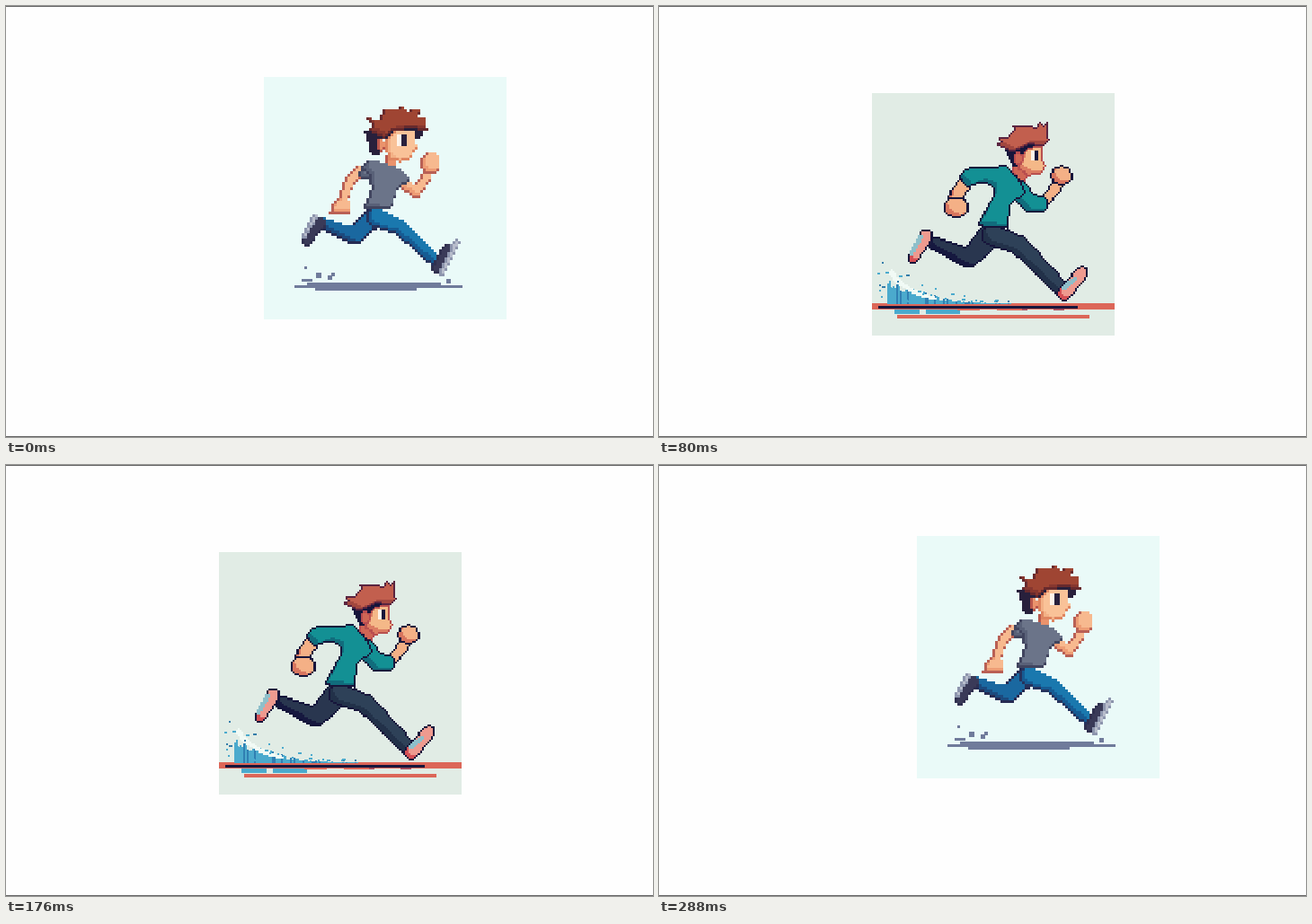
Recreate the animation shown at these times as an HTML page with a canvas. Size 720 by 480 pixels, loop 0.32 s.

```html
<!DOCTYPE html>
<html>
<head>
<meta charset="utf-8">
<style>
  html, body { margin: 0; width: 100%; height: 100%; overflow: hidden; background: #fefefe; }
  canvas { display: block; }
</style>
</head>
<body>
<canvas id="stage" width="720" height="480"></canvas>
<script>
const stage = document.getElementById("stage").getContext("2d");
const parse = text => text.split(" ").map(pair => pair.split(",").map(Number));

// Shapes are tests: (x, y) => is the point inside?
const blob = (cx, cy, rx, ry) => (x, y) => Math.hypot((x - cx) / rx, (y - cy) / ry) < 1;

function poly(text) {
  const points = parse(text);
  return (x, y) => points.reduce((inside, [ax, ay], i) => {
    const [bx, by] = points[(i + 1) % points.length];
    const crosses = ay > y !== by > y && x < ax + (y - ay) / (by - ay) * (bx - ax);
    return crosses ? !inside : inside;
  }, false);
}

// A line through joints whose width goes from "start" to "end".
function limb(text, start, end = start) {
  const joints = parse(text), last = joints.length - 1;
  return (x, y) => joints.slice(1).some(([bx, by], i) => {
    const [ax, ay] = joints[i], dx = bx - ax, dy = by - ay;
    const along = ((x - ax) * dx + (y - ay) * dy) / (dx * dx + dy * dy);
    const t = Math.min(1, Math.max(0, along));
    const width = start + (end - start) * (i + t) / last;
    return Math.hypot(x - ax - t * dx, y - ay - t * dy) < width / 2;
  });
}

function seeded(seed) {
  return () => (seed = seed * 16807 % 2147483647) / 2147483647;
}

function makeScene(left, top, cells, background, edges) {
  const canvas = document.createElement("canvas");
  canvas.width = 720;
  canvas.height = 480;
  const g = canvas.getContext("2d");
  const cell = 270 / cells;

  function rect(color, x, y, w, h) {
    g.fillStyle = color;
    g.fillRect(x, y, w, h);
  }

  // Colours are [edge, base, light]; light falls from the upper right.
  function shade(inside, [edge, base = edge, light = base]) {
    const isEdge = (x, y) => edges.some(([dx, dy]) => !inside(x + dx * cell, y + dy * cell));
    for (let row = 0; row < cells; row++) {
      for (let col = 0; col < cells; col++) {
        const x = left + (col + 0.5) * cell, y = top + (row + 0.5) * cell;
        if (!inside(x, y)) continue;
        const color = isEdge(x, y) ? edge : inside(x - 5, y + 5) ? light : base;
        const x0 = Math.round(x - cell / 2), y0 = Math.round(y - cell / 2);
        rect(color, x0, y0, Math.round(x + cell / 2) - x0, Math.round(y + cell / 2) - y0);
      }
    }
  }

  rect("#fefefe", 0, 0, 720, 480);
  rect("#666", 0, 0, 720, 1);
  rect("#666", 0, 479, 720, 1);
  rect(background, left, top, 270, 270);
  return { canvas, rect, shade };
}

function drawRunner({ shade, rect }, pose, colors) {
  shade(pose.backLeg, colors.backLeg);
  shade(pose.frontLeg, colors.frontLeg);
  for (const shoe of pose.shoes) shade(shoe, colors.shoe);
  for (const sole of pose.soles) shade(sole, colors.sole);
  shade(pose.backArm, colors.skin);
  shade(pose.backHand, colors.skin);
  shade(pose.frontArm, colors.skin);
  shade(pose.fist, colors.skin);
  shade(pose.neck, colors.shadowSkin);
  shade(pose.sleeve, colors.shirt);
  shade(pose.torso, colors.shirt);
  shade(pose.nape, colors.nape);
  shade(pose.face, colors.face);
  shade(pose.ear, colors.shadowSkin);
  const [x, y, white, pupil, height] = pose.eye;
  rect("#fff4ea", x, y, white, height);
  rect(colors.nape[0], x + white, y, pupil, height);
  shade(pose.hair, colors.hair);
}

function grayRunner() {
  const scene = makeScene(287, 79, 90, "#eafaf8", [[-1, 0], [0, 1]]);
  const { rect } = scene, slate = "#707b9b";
  rect(slate, 335, 308, 149, 6);
  rect(slate, 321, 311, 187, 3);
  rect(slate, 344, 314, 113, 3);
  rect(slate, 329, 304, 12, 3);
  for (const [x, y, size] of [[332, 290, 3], [345, 297, 6], [358, 300, 5], [362, 297, 4], [490, 304, 5]])
    rect(slate, x, y, size, size);

  drawRunner(scene, {
    backLeg: limb("408,236 387,257 354,243", 24, 14),
    frontLeg: limb("411,236 437,246 457,264 480,286", 21, 13),
    shoes: [limb("348,242 335,262", 15, 11), limb("481,291 491,271", 14, 12)],
    soles: [limb("344,234 332,255", 6), limb("484,299 501,264", 6, 8)],
    backArm: limb("393,185 381,198 373,220", 14, 11),
    backHand: poly("365,217 382,217 383,231 360,231"),
    frontArm: limb("442,198 456,208 468,190", 12),
    fist: blob(472, 175, 11.5, 12),
    neck: limb("429,168 429,176", 12),
    sleeve: limb("404,181 401,186", 16),
    torso: poly("395,178 402,172 420,174 435,180 448,189 448,196 436,204 428,227 397,226 406,205 405,191"),
    nape: poly("399,139 430,136 464,136 462,149 454,149 444,142 428,149 418,149 415,165 406,165"),
    face: poly("421,151 434,138 455,140 457,160 449,170 440,174 425,172"),
    ear: blob(417, 155, 5, 7),
    eye: [435, 143, 5, 6, 13],
    hair: poly("400,124 414,127 422,114 434,115 440,110 446,117 463,114 458,122 467,126 469,138 448,137 430,139 422,148 403,139 407,132")
  }, {
    backLeg: ["#262b53", "#1c4a7e", "#1a68a0"],
    frontLeg: ["#26345e", "#165b93", "#1a78ae"],
    shoe: ["#30304f", "#3a3a58"],
    sole: ["#8d95ad", "#b8bdcc"],
    skin: ["#b96055", "#ee9d75", "#f7b98f"],
    face: ["#df8560", "#f3b186", "#f9c298"],
    shadowSkin: ["#b9574c", "#ea936c"],
    shirt: ["#41455f", "#596178", "#6b7489"],
    nape: ["#28203c"],
    hair: ["#672a2d", "#87372f", "#9f4533"]
  });
  return scene.canvas;
}

function tealRunner() {
  const paper = "#e1ece5", ink = "#17153b", red = "#dc6658", blue = "#4baacd";
  const scene = makeScene(237, 97, 128, paper, [[-1, 0], [0, 1], [1, 0], [0, -1]]);
  const { rect, shade } = scene, random = seeded(17);

  // track and its broken reflection
  rect(red, 237, 331, 270, 7);
  rect(red, 265, 344, 214, 4);
  rect(ink, 244, 334, 222, 3);
  for (let i = 0; i < 24; i++) {
    const wet = i < 12, x = (wet ? 262 : 330) + random() * (wet ? 68 : 120);
    rect(wet ? blue : random() < 0.5 ? "#a34a5a" : red, Math.round(x), wet ? 338 : 337, 12, wet ? 5 : 2);
  }

  // splash: a plume that falls away to the right, with loose drops
  for (let x = 254; x < 398; x += 2) {
    const height = 34 * Math.exp(-Math.abs(x - 263) / 34) * (0.5 + random() / 2);
    rect(random() < 0.2 ? "#307fb2" : blue, x, Math.round(332 - height), 2, Math.round(height));
  }
  shade(limb("259,297 267,308 285,319 307,326", 6, 4), ["#f1faf5"]);
  for (let i = 0; i < 36; i++) {
    const reach = random() ** 2;
    const x = 242 + reach * 150, y = 328 - random() * 52 * (1 - reach) ** 2;
    rect(i % 4 ? blue : "#357da9", Math.round(x), Math.round(y), random() < 0.3 ? 4 : 2, 2);
  }

  drawRunner(scene, {
    backLeg: limb("370,254 345,281 308,265", 28, 16),
    frontLeg: limb("371,255 400,266 421,287 445,312", 24, 18),
    shoes: [limb("297,257 283,280", 17, 13), limb("451,320 471,297", 17, 15)],
    soles: [limb("291,257 281,276", 5), limb("450,315 462,304", 5)],
    backArm: limb("341,196 331,211 330,222", 16, 18),
    backHand: blob(331, 224, 14, 12),
    frontArm: limb("430,217 444,199", 13),
    fist: blob(448, 189, 12.5, 11),
    neck: limb("399,181 403,190", 13),
    sleeve: limb("398,203 414,220 424,220", 22, 20),
    torso: poly("333,190 345,179 386,178 399,189 408,208 392,221 388,248 354,245 371,212 372,202 359,197 343,203"),
    nape: poly("382,155 412,152 426,155 425,160 413,160 405,166 402,178 394,179"),
    face: poly("404,166 412,158 427,155 426,169 431,178 424,188 411,189 399,182"),
    ear: blob(400, 170, 5, 7),
    eye: [414, 161, 4, 4, 11],
    hair: poly("373,154 381,151 377,146 388,146 397,137 392,133 412,132 421,136 422,127 427,133 433,129 433,145 436,149 427,156 411,154 393,163 383,158")
  }, {
    backLeg: ["#11113a", "#16183f", "#29364f"],
    frontLeg: [ink, "#223149", "#2e4158"],
    shoe: [ink, "#d55055", "#ee9a8f"],
    sole: ["#8ebfca"],
    skin: [ink, "#d8765f", "#f4b086"],
    face: ["#b8504f", "#dc7c62", "#f4b888"],
    shadowSkin: ["#b94c50", "#cf6655"],
    shirt: [ink, "#116c7c", "#139094"],
    nape: [ink],
    hair: ["#5a2440", "#a2473f", "#c25f4e"]
  });
  return scene.canvas;
}

const gray = grayRunner(), teal = tealRunner();

function draw() {
  const t = performance.now() % 320;
  stage.drawImage(t >= 80 && t < 240 ? teal : gray, 0, 0);
  requestAnimationFrame(draw);
}
draw();
</script>
</body>
</html>
```
